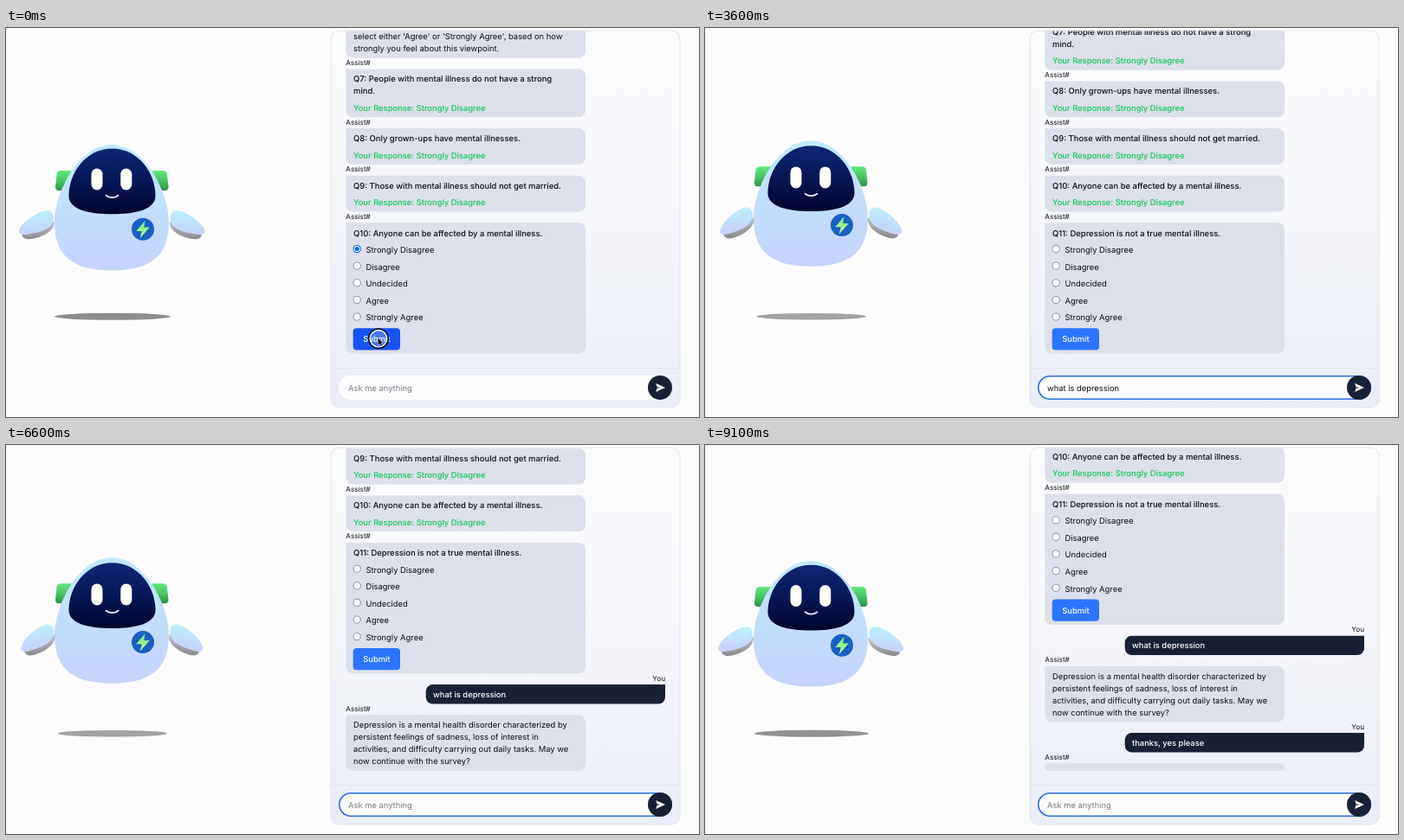
Animation, 800 px wide and 450 px high, one loop 9.2 s. Source, as an HTML page with a canvas:

```html
<!DOCTYPE html>
<html lang="en">
<head>
<meta charset="utf-8">
<title>Survey assistant</title>
<style>
html, body { margin: 0; width: 100%; height: 100%; overflow: hidden; background: #fdfdfd; }
canvas { display: block; width: 800px; height: 450px; }
</style>
</head>
<body>
<canvas id="stage" width="800" height="450"></canvas>
<script>
const ctx = document.getElementById('stage').getContext('2d');
const LOOP = 9200, STEP = 100;
const SENT_1 = 3800, SENT_2 = 8800, ANSWERED = 300, FOCUSED = 900;
const INK = '#0d0f14', NAVY = '#182133', BUBBLE = '#dce0eb', GREEN = '#14cb57';
const BOTTOM = 376.7, LABEL = 12.8, LINE = 14, ROW = 19.6, PAD = 4.2;

const OPTIONS = ['Strongly Disagree', 'Disagree', 'Undecided', 'Agree', 'Strongly Agree'];
const REPLY = [
  'Depression is a mental health disorder characterized by',
  'persistent feelings of sadness, loss of interest in',
  'activities, and difficulty carrying out daily tasks. May we',
  'now continue with the survey?'
];
const ASK_1 = 'what is depression', ASK_2 = 'thanks, yes please';

const clamp = (v, a, b) => Math.min(b, Math.max(a, v));
const ease = k => k * k * (3 - 2 * k);

function text(str, x, y, color = INK, weight = 400, size = 9.4, align = 'left') {
  ctx.font = `${weight} ${size}px Inter, "Liberation Sans", sans-serif`;
  ctx.textRendering = 'geometricPrecision';
  ctx.fillStyle = color;
  ctx.textAlign = align;
  ctx.textBaseline = 'alphabetic';
  ctx.fillText(str, x, y + size * 0.36);
}

function box(x, y, w, h, r, fill) {
  ctx.beginPath();
  ctx.roundRect(x, y, w, h, r);
  ctx.fillStyle = fill;
  ctx.fill();
}

function disc(x, y, r, fill) {
  ctx.beginPath();
  ctx.arc(x, y, r, 0, 7);
  ctx.fillStyle = fill;
  ctx.fill();
}

function ring(x, y, r, color, width) {
  ctx.beginPath();
  ctx.arc(x, y, r, 0, 7);
  ctx.strokeStyle = color;
  ctx.lineWidth = width;
  ctx.stroke();
}

function shade(y0, y1, ...colors) {
  const g = ctx.createLinearGradient(0, y0, 0, y1);
  colors.forEach((c, i) => g.addColorStop(i / (colors.length - 1), c));
  return g;
}

function shape(d, fill) {
  ctx.fillStyle = fill;
  ctx.fill(new Path2D(d));
}

function shifted(dy, draw) {
  ctx.save();
  ctx.translate(0, dy);
  draw();
  ctx.restore();
}

// Chat messages: each has a height and a draw(top)
const note = lines => ({
  h: lines.length * LINE + 2 * PAD,
  draw: y => lines.forEach((s, i) => text(s, 401, y + 11.4 + i * LINE))
});

const answered = (...lines) => ({
  h: lines.length * LINE + 27.8,
  draw(y) {
    lines.forEach((s, i) => text(s, 401, y + 11.5 + i * LINE, INK, 500, 9.45));
    text('Your Response: Strongly Disagree', 401, y + 17.2 + lines.length * LINE, GREEN, 500);
  }
});

const form = (question, picked, pressed) => ({
  h: 151.4,
  draw(y) {
    text(question, 401, y + 11.8, INK, 500, 9.45);
    OPTIONS.forEach((s, i) => {
      const cy = y + 31.3 + i * ROW, on = i === picked;
      disc(405.2, cy - 1, 4.2, '#fff');
      ring(405.2, cy - 1, 4.1, on ? '#0b69f5' : '#777b82', on ? 1.1 : 0.8);
      if (on) disc(405.2, cy - 1, 2.5, '#0b69f5');
      text(s, 415.5, cy);
    });
    box(400.7, y + 122, 54.3, 25.3, 4, pressed ? '#1653f4' : '#2b74ff');
    text('Submit', 427.9, y + 134.8, '#fff', 500, 9.4, 'center');
  }
});

const mine = str => ({
  h: 22.4,
  user: true,
  draw: y => text(str, 493, y + 11.2, '#fff', 500)
});

function streamed(count) {
  const out = [];
  for (const line of REPLY) {
    if (count <= 0) break;
    const words = line.split(' ');
    out.push(words.slice(0, count).join(' '));
    count -= words.length;
  }
  return out;
}

function messages(t) {
  const list = [
    note(['', "select either 'Agree' or 'Strongly Agree', based on how", 'strongly you feel about this viewpoint.']),
    answered('Q7: People with mental illness do not have a strong', 'mind.'),
    answered('Q8: Only grown-ups have mental illnesses.'),
    answered('Q9: Those with mental illness should not get married.')
  ];
  const q10 = 'Q10: Anyone can be affected by a mental illness.';
  if (t < ANSWERED) return [...list, form(q10, 0, true)];
  list.push(answered(q10), form('Q11: Depression is not a true mental illness.', -1));
  if (t >= SENT_1) list.push(mine(ASK_1), note(streamed(Math.floor((t - 4215) / 30))));
  if (t >= SENT_2) list.push(mine(ASK_2), note([]));
  return list;
}

function drawChat(t) {
  let y = BOTTOM;
  ctx.save();
  ctx.beginPath();
  ctx.rect(375, 3.5, 403, 389);
  ctx.clip();
  for (const m of messages(t).reverse()) {
    y -= m.h;
    if (m.user) {
      box(484.7, y, 276.3, m.h, [8, 0, 8, 8], NAVY);
      text('You', 761, y - 7.4, INK, 400, 8.2, 'right');
    } else {
      box(392.3, y, 276.7, m.h, [0, 8, 8, 8].map(r => Math.min(r, m.h / 2)), BUBBLE);
      text('Assist#', 392.3, y - 7.4, INK, 400, 8.2);
    }
    m.draw(y);
    y -= LABEL;
  }
  ctx.restore();
}

function typed(t) {
  if (t < SENT_1) return ASK_1.slice(0, clamp((t - 1700) / 100, 0, 99));
  if (t < SENT_2) return ASK_2.slice(0, clamp((t - 6800) / 100, 0, 99));
  return '';
}

function drawPanel() {
  box(375, 3, 403, 436, 10, shade(3, 439, '#fcfcfe', '#f5f6fb', '#e9edf7'));
  ctx.strokeStyle = '#e1e4ec';
  ctx.lineWidth = 1;
  ctx.stroke();
}

function drawInput(t) {
  ctx.fillStyle = '#e0e4ed';
  ctx.fillRect(375.5, 393, 402, 1);
  box(384, 402, 385, 28, 14, '#fdfdfe');
  const focus = t >= FOCUSED, str = typed(t);
  if (focus) {
    ctx.beginPath();
    ctx.roundRect(384.8, 402.8, 383.4, 26.4, 13.2);
    ctx.strokeStyle = '#2a6fdb';
    ctx.lineWidth = 1.6;
    ctx.stroke();
  }
  text(str || 'Ask me anything', 395, 416.3, str ? INK : '#777b83');
  if (focus && t % 1000 > 650) {
    const w = str ? ctx.measureText(str).width : 0;
    ctx.fillStyle = INK;
    ctx.fillRect(395 + w, 410.5, 0.8, 11.5);
  }
  disc(755, 416, 14, NAVY);
  shape('M750.2 410.9L761 416L750.2 421.1L751.6 416.7L756 416L751.6 415.3Z', '#fff');
}

function drawPointer(t) {
  if (t >= 1000) return;
  const x = 430, y = 359.3 + 62 * ease(clamp((t - 300) / 500, 0, 1));
  disc(x, y, 11, 'rgba(255,255,255,.22)');
  ring(x, y, 9.8, '#fff', 1.4);
  ring(x, y, 11.3, '#10131a', 1.5);
  ctx.save();
  ctx.translate(x, y);
  const arrow = new Path2D('M-.5 -.5V7.2L1.4 5.5L2.7 8.2L4 7.6L2.8 5H5.2Z');
  ctx.strokeStyle = '#fff';
  ctx.lineWidth = 0.8;
  ctx.stroke(arrow);
  ctx.fillStyle = '#000';
  ctx.fill(arrow);
  ctx.restore();
}

// Draws a left-hand part, then its mirror image about the body axis
function bothSides(draw) {
  draw();
  ctx.save();
  ctx.translate(244.5, 0);
  ctx.scale(-1, 1);
  draw();
  ctx.restore();
}

function ear() {
  shape('M63 165H76V188H61Q56.500 188 57 183L58.500 169.500Q59 165 63 165Z',
    shade(165, 188, '#62e87b', '#49c465', '#2c9348'));
}

function arm(angle) {
  ctx.save();
  ctx.translate(55, 220);
  ctx.rotate(angle);
  ctx.translate(-55, -220);
  shape('M18.500 236C17.500 244 24 245.500 32 243.500C44 241 55 235 56 225L50 219Z',
    shade(224, 244, '#c4c4c8', '#8a8a8e'));
  shape('M55 221C55.500 211 50 210 43 212C31 215.500 18 226 15.200 233.500C13.500 240 21 239.500 29 238C41 236 54 232 55 221Z',
    shade(211, 238, '#bdeeff', '#c7d2ff'));
  ctx.restore();
}

function visor() {
  shape('M122.500 139.500C153 139.500 172.500 168 172.500 194C172.500 210 150 215.300 122.500 215.300C95 215.300 72.500 210 72.500 194C72.500 168 92 139.500 122.500 139.500Z',
    shade(140, 215, '#0d2676', '#081657', '#03052f'));
}

function face() {
  box(98.5, 162.5, 13, 25, 6.5, '#fff');
  box(132.3, 162.5, 13, 25, 6.5, '#fff');
  ctx.beginPath();
  ctx.moveTo(115.5, 193.8);
  ctx.quadraticCurveTo(122.5, 198.6, 129.5, 193.8);
  ctx.strokeStyle = '#e6efff';
  ctx.lineWidth = 1.8;
  ctx.lineCap = 'round';
  ctx.stroke();
}

function body(sway) {
  bothSides(ear);
  shape('M122 135C160 135 188 190 188 225C188 265 165 280.500 122 280.500C79 280.500 56 265 56 225C56 190 84 135 122 135Z',
    shade(135, 280, '#bfeaff', '#c2defe', '#c7d3ff'));
  disc(158, 232.8, 13, '#1861c3');
  shape('M160.500 222.800L150.300 235H156.800L154.800 243.300L165.800 230.600H159.300Z',
    shade(223, 243, '#6deb8c', '#c8fd85'));
  bothSides(() => arm(-sway));
}

function drawRobot(t) {
  const c = Math.cos(2 * Math.PI * (t + 50) / 1000);
  const grey = Math.round(154 - 14 * c);
  ctx.beginPath();
  ctx.ellipse(123, 333.8, 64.5 + 2.6 * c, 3.9 + 0.15 * c, 0, 0, 7);
  ctx.fillStyle = `rgb(${grey},${grey},${grey})`;
  ctx.fill();

  // The face lags behind the body as it bobs
  const lift = 3.05 * (c - 0.95);
  shifted(lift, () => body((0.95 - c) * 0.088));
  shifted(lift * 0.7, visor);
  shifted(lift * 0.45, face);
}

function render(t) {
  ctx.fillStyle = '#fdfdfd';
  ctx.fillRect(0, 0, 800, 450);
  ctx.fillStyle = '#f1f1f2';
  ctx.fillRect(0, 0, 1, 450);
  drawRobot(t);
  drawPanel();
  drawChat(t);
  drawInput(t);
  drawPointer(t);
}

const start = performance.now();
function tick() {
  const t = (performance.now() - start) % LOOP;
  render(Math.floor(t / STEP) * STEP);
  requestAnimationFrame(tick);
}
tick();
</script>
</body>
</html>
```
